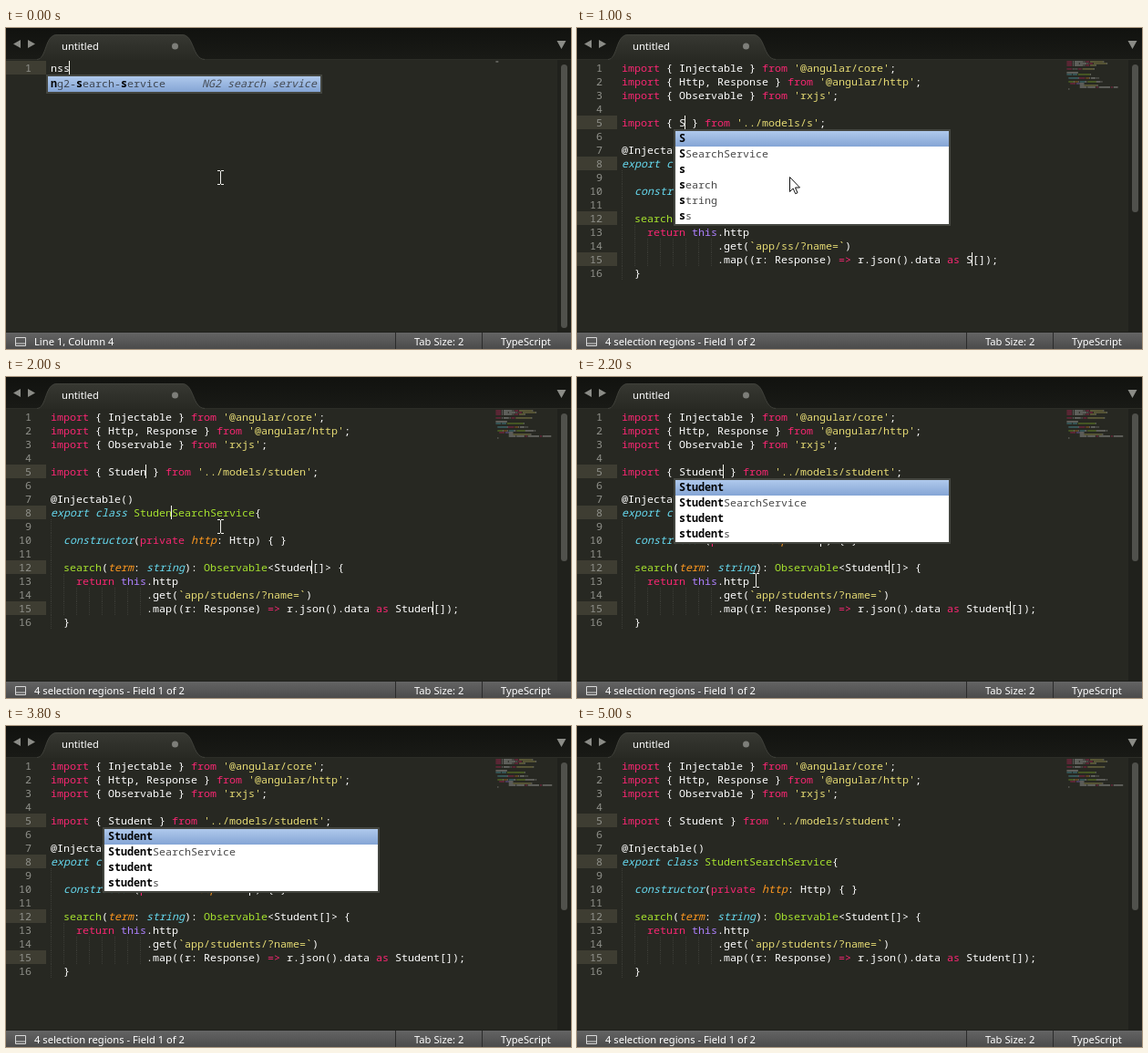
Write an HTML page with a canvas that moves like this. It is 620 by 352 pixels and loops after 5200 ms.

```html
<!DOCTYPE html>
<html lang="en">
<head>
<meta charset="utf-8">
<title>Editor snippet</title>
<style>
  html, body { margin: 0; width: 100%; height: 100%; overflow: hidden; background: #272822; }
  canvas { display: block; }
</style>
</head>
<body>
<canvas id="stage" width="620" height="352"></canvas>
<script>
const ctx = document.getElementById('stage').getContext('2d');
const LOOP = 5200, CHAR = 7, ROW = 15, LEFT = 49, TOP = 36;
const MONO = '11.667px "Noto Sans Mono", "DejaVu Sans Mono", monospace';
const UI = '11.2px "Noto Sans", "Open Sans", sans-serif';

// Style codes used after "§" in the code lines.
const STYLES = {
  w: ['#ffffff'], k: ['#f92672'], g: ['#a6e22e'], s: ['#e6db74'], v: ['#ae81ff'],
  t: ['#66d9ef', 'italic'], o: ['#fd971f', 'italic']
};

// Each track holds [start time, value] pairs.
const NAMES = [[0, ''], [400, 'Example'], [1000, 'S'], [1400, 'St'], [1800, 'Stud'], [2000, 'Studen'], [2200, 'Student']];
const POPUP = [[0, true], [400, false], [1000, true], [1800, false], [2200, true], [4000, false]];
const POINTER = [
  [0, ['beam', 235, 164]], [1000, ['arrow', 233, 163]], [1800, ['beam', 235, 164]],
  [2200, ['beam', 196, 223]], [3000, null]
];
const BLINK = [0, 200, 400, 800, 1000, 1200, 1400, 1600, 1800, 2400, 2600, 2800, 3200, 3400, 3600, 3800, 4400, 4800];

const at = (track, t) => track.filter(([start]) => start <= t).pop()[1];
const caretOn = t => BLINK.filter(start => start <= t).length % 2 === 1;

// "§@" inserts the edited field, with a caret after it.
const codeLines = lower => [
  "§kimport§w { Injectable } §kfrom §s'@angular/core'§w;",
  "§kimport§w { Http, Response } §kfrom §s'@angular/http'§w;",
  "§kimport§w { Observable } §kfrom §s'rxjs'§w;",
  '',
  `§kimport§w { §@ } §kfrom §s'../models/${lower}'§w;`,
  '',
  '§w@Injectable()',
  '§texport class §g§@SearchService§w{',
  '',
  '  §tconstructor§w(§kprivate §ohttp§w: Http) { }',
  '',
  '  §gsearch§w(§oterm§w: §tstring§w): §gObservable§w<§@[]> {',
  '    §kreturn §vthis§w.http',
  `               .get(§s\`app/${lower}s/?name=\`§w)`,
  '               .map((r: Response) §k=>§w r.json().data §kas§w §@[]);',
  '  §w}'
];

function parse(line, name) {
  const tokens = [];
  let style = STYLES.w, col = 0;
  const add = (text, field) => {
    if (text) tokens.push({ text, style, col, field });
    col += text.length;
  };
  line.split(/(§.)/).forEach(part => {
    if (part === '§@') add(name, true);
    else if (part[0] === '§') style = STYLES[part[1]];
    else add(part, false);
  });
  return tokens;
}

function rect(x, y, w, h, fill) {
  ctx.fillStyle = fill;
  ctx.fillRect(x, y, w, h);
}

function gradient(y0, y1, from, to) {
  const g = ctx.createLinearGradient(0, y0, 0, y1);
  g.addColorStop(0, from);
  g.addColorStop(1, to);
  return g;
}

function shape(path, fill, stroke) {
  const p = new Path2D(path);
  if (fill) { ctx.fillStyle = fill; ctx.fill(p); }
  if (stroke) { ctx.strokeStyle = stroke; ctx.lineWidth = 1; ctx.stroke(p); }
}

function label(text, x, y) {
  ctx.font = UI;
  ctx.fillStyle = '#fff';
  ctx.fillText(text, x, y);
}

// Fixed character cells keep the columns aligned.
function mono(text, x, y, color, variant = '') {
  ctx.font = `${variant} ${MONO}`;
  ctx.fillStyle = color;
  [...text].forEach((c, i) => ctx.fillText(c, x + i * CHAR, y));
}

function drawChrome(status, thumbBottom) {
  rect(0, 0, 620, 352, '#272822');
  rect(0, 0, 620, 35, gradient(0, 34, '#11120f', '#191a16'));
  rect(0, 34, 620, 1, '#2d2e28');
  shape('M34 35C45 34 42 7 56 7H193C207 7 204 34 218 35Z', gradient(7, 35, '#373832', '#282923'));
  shape('M34 34.5C45 34 42 7.5 56 7.5H193C207 7.5 204 34 218 34.5', null, '#40413b');
  label('untitled', 61, 24);
  shape('M182 20a3.5 3.5 0 1 0 7 0a3.5 3.5 0 1 0 -7 0', '#7d7e79');
  shape('M16 13V22L8 17.5ZM24 13V22L32 17.5ZM604.5 14H614.5L609.5 23Z', '#8b8c87');

  rect(605, 35, 15, 298, '#20211c');
  ctx.beginPath();
  ctx.roundRect(609, 40, 7, thumbBottom - 40, 3.5);
  ctx.fillStyle = '#50514c';
  ctx.fill();

  rect(0, 333, 620, 1, '#20211d');
  rect(0, 334, 620, 18, gradient(334, 352, '#646464', '#4b4b4b'));
  [427, 522].forEach(x => rect(x, 334, 1, 18, '#2b2b2b'));
  shape('M10.5 339.5H21.5V348.5H10.5ZM10.5 346H21.5', null, '#d8d8d8');
  label(status, 31, 348);
  label('Tab Size: 2', 448, 348);
  label('TypeScript', 543, 348);
}

function drawRow(tokens, index, view) {
  const y = TOP + index * ROW;
  const active = tokens.some(token => token.field);
  if (active) rect(0, y, 44, ROW, '#3e3d32');
  const number = String(index + 1);
  mono(number, 28 - number.length * CHAR, y + 12, '#90918b');

  for (const { text, style: [color, variant], col, field } of tokens) {
    const x = LEFT + col * CHAR;
    if (field && view.selected) rect(x, y + 1, text.length * CHAR, ROW - 1, '#4b4b42');
    mono(text, x, y + 12, color, variant);
    if (field && view.caret) rect(x + text.length * CHAR - 1, y, 1, ROW, '#f8f8f0');

    ctx.globalAlpha = 0.5;
    [...text].forEach((c, i) => {
      if (c !== ' ') rect(537.5 + (col + i) * 0.95, TOP + index * 2 + 0.4, 0.9, 1.1, color);
    });
    ctx.globalAlpha = 1;
  }
}

function drawGuides(lines) {
  lines.forEach((line, index) => {
    const indent = line ? line.search(/[^ ]/) : index > 7 ? 2 : 0;
    for (let col = 0; col < indent; col += 2)
      for (let dy = 0; dy < ROW; dy += 2)
        rect(LEFT + col * CHAR, TOP + index * ROW + dy, 1, 1, '#3b3c36');
  });
}

function popupBox(x, y, width, rows) {
  rect(x, y, width, rows * 17 + 4, '#444640');
  rect(x + 2, y + 2, width - 4, rows * 17, '#ffffff');
  rect(x + 2, y + 2, width - 4, 17, gradient(y + 2, y + 19, '#afc9ec', '#85a5d5'));
}

function drawTriggerPopup() {
  popupBox(44, 51, 303, 1);
  const text = 'ng2-search-service', matches = [0, 4, 11];
  [...text].forEach((c, i) => {
    const hit = matches.includes(i);
    mono(c, LEFT + i * CHAR, 65, hit ? '#000' : '#3d4550', hit ? 'bold' : '');
  });
  mono('NG2 search service', 215, 65, '#454c56', 'italic');
}

function drawNamePopup(name, lower) {
  const words = ['search', 'string'].filter(word => word.startsWith(lower));
  const items = [name, name + 'SearchService', lower, ...words, lower + 's'];
  popupBox(106, 111, 304, items.length);
  items.forEach((item, i) => {
    const y = 125 + i * 17;
    mono(item.slice(0, name.length), 112, y, '#000', 'bold');
    mono(item.slice(name.length), 112 + name.length * CHAR, y, '#484848');
  });
}

function drawPointer([kind, x, y]) {
  ctx.save();
  ctx.translate(x, y);
  if (kind === 'beam')
    shape('M-3 -7.5H0M1 -7.5H4M.5 -7V7M-3 7.5H0M1 7.5H4', null, '#f0f0ec');
  else
    shape('M.5 .5V16.5L4.2 13L6.7 18.7L9 17.7L6.5 12H11.5Z', '#fff', '#111');
  ctx.restore();
}

function draw(t) {
  const name = at(NAMES, t), lower = name.toLowerCase();
  const lines = name ? codeLines(lower) : ['§@'];
  const view = { caret: caretOn(t), selected: name === 'Example' };

  drawChrome(name ? '4 selection regions - Field 1 of 2' : 'Line 1, Column 4', name ? 202 : 329);
  drawGuides(lines);
  lines.forEach((line, i) => drawRow(parse(line, name || 'nss'), i, view));
  if (at(POPUP, t)) name ? drawNamePopup(name, lower) : drawTriggerPopup();

  const pointer = at(POINTER, t);
  if (pointer) drawPointer(pointer);
}

const start = performance.now();
function tick() {
  draw((performance.now() - start) % LOOP);
  requestAnimationFrame(tick);
}
tick();
</script>
</body>
</html>
```
